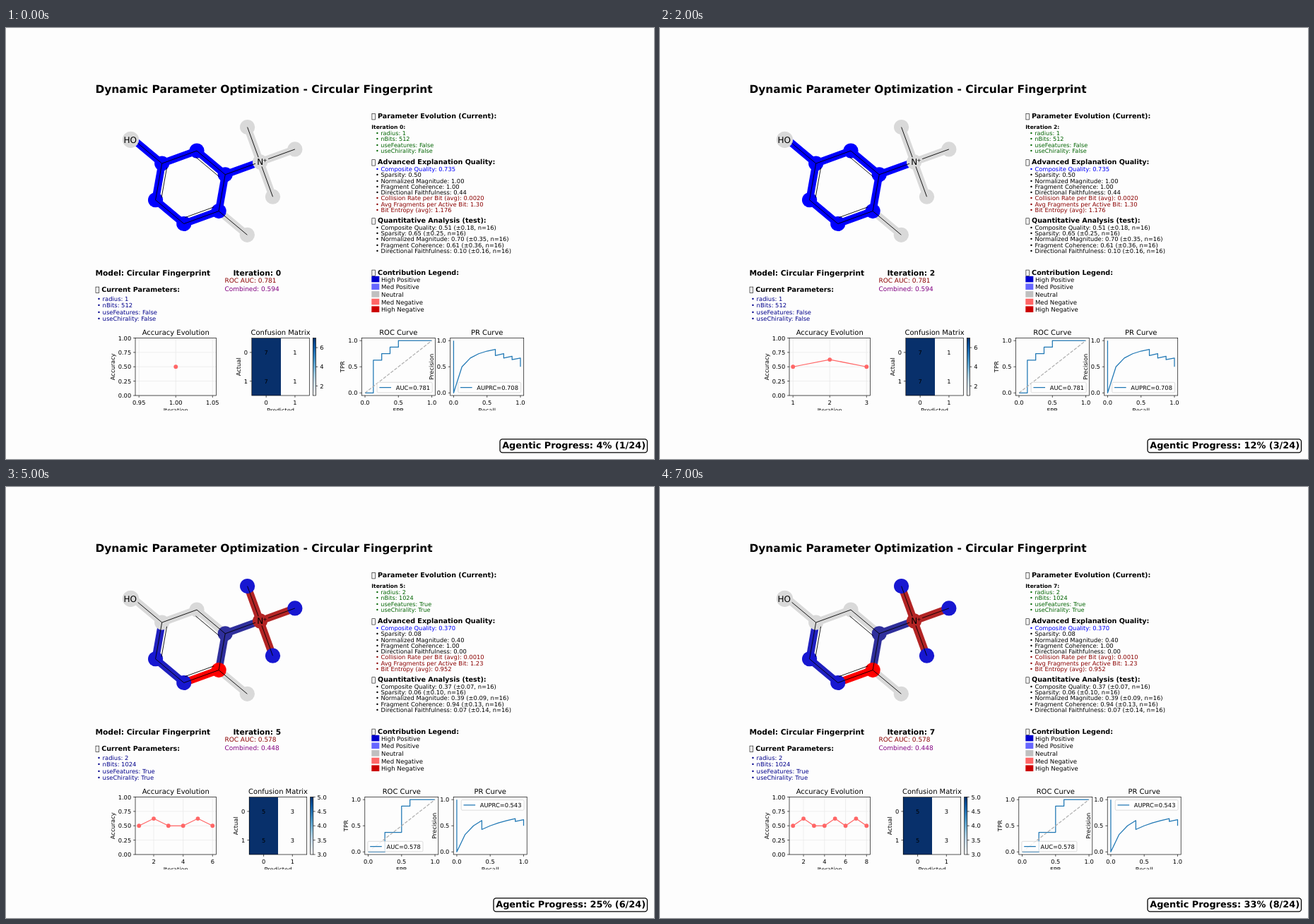
Write an HTML page that moves like this. It is 917 px wide and 611 px high and loops after 8 s.

```html
<!DOCTYPE html>
<html lang="en">
<head>
<meta charset="utf-8">
<title>Dynamic Parameter Optimization</title>
<style>
html, body { margin: 0; width: 100%; height: 100%; overflow: hidden; background: #fdfdfd; }
svg { display: block; width: 917px; height: 611px; font-family: "DejaVu Sans", sans-serif; text-rendering: geometricPrecision; }
</style>
</head>
<body>
<svg id="stage" viewBox="0 0 917 611" xmlns="http://www.w3.org/2000/svg"></svg>
<script>
const STEP = 1000, COUNT = 8, TOTAL = 24;
const stage = document.getElementById('stage');

// P / N: true class of the test samples, ordered by falling score
const early = {
  radius: 1, bits: 512, flag: 'False', auc: '0.781', comb: '0.594', auprc: '0.708',
  quality: ['0.735', '0.50', '1.00', '1.00', '0.44', '0.0020', '1.30', '1.176'],
  quant: ['0.51 (±0.18', '0.65 (±0.25', '0.70 (±0.35', '0.61 (±0.36', '0.10 (±0.16'],
  atoms: 'gbbbbbbggggg', bonds: 'bbbbbbbbgggg',
  cells: [7, 1, 7, 1], bar: ['6', '4', '2'], cmX: 347.8, rocX: 503.3,
  order: 'NPPPPPNPNPNPNNNN', rocKey: 'lower right', prKey: 'lower right'
};
const flat = {
  radius: 1, bits: 512, flag: 'True', auc: '0.562', comb: '0.475', auprc: '0.571',
  quality: ['0.250', '1.00', '0.00', '0.00', '0.00', '0.0020', '1.43', '1.338'],
  quant: ['0.37 (±0.08', '0.43 (±0.22', '0.37 (±0.17', '0.69 (±0.26', '0.00 (±0.00'],
  atoms: 'gggggggggggg', bonds: 'gggggggggggg',
  cells: [6, 2, 4, 4], bar: ['6', '5', '4', '3', '2'], cmX: 345, rocX: 501,
  order: 'NPNPPPPNNNPNPNNP', rocKey: 'center right', prKey: 'upper right'
};
const mixed = {
  radius: 2, bits: 1024, flag: 'True', auc: '0.578', comb: '0.448', auprc: '0.543',
  quality: ['0.370', '0.08', '0.40', '1.00', '0.00', '0.0010', '1.23', '0.952'],
  quant: ['0.37 (±0.07', '0.06 (±0.10', '0.39 (±0.09', '0.94 (±0.13', '0.07 (±0.14'],
  atoms: 'gggiruunuuug', bonds: 'gggirvvinnng',
  cells: [5, 3, 5, 3], bar: ['5.0', '4.5', '4.0', '3.5', '3.0'], cmX: 344.2, rocX: 507.8,
  order: 'NNPPPNNPPPPNPNNN', rocKey: 'lower left', prKey: 'upper right'
};
const wide = {
  radius: 2, bits: 1024, flag: 'False', auc: '0.703', comb: '0.571', auprc: '0.647',
  quality: ['0.489', '0.08', '0.87', '1.00', '0.00', '0.0010', '1.22', '1.028'],
  quant: ['0.39 (±0.08', '0.13 (±0.13', '0.44 (±0.19', '0.86 (±0.22', '0.11 (±0.19'],
  atoms: 'gbbbbbgbbbbb', bonds: 'bbbbbbgbbbbb',
  cells: [7, 1, 5, 3], bar: ['6', '4', '2'], cmX: 344, rocX: 499.6,
  order: 'NPPPNPNPPNPPNNNN', rocKey: 'lower right', prKey: 'upper right'
};
const runs = [early, flat, early, mixed, wide, mixed, wide, mixed];
const accuracy = runs.map(r => (r.cells[0] + r.cells[3]) / 16);

const metrics = ['Composite Quality', 'Sparsity', 'Normalized Magnitude', 'Fragment Coherence',
  'Directional Faithfulness', 'Collision Rate per Bit (avg)', 'Avg Fragments per Active Bit', 'Bit Entropy (avg)'];
const legend = [['High Positive', '#0000cc'], ['Med Positive', '#6666ff'], ['Neutral', '#c0c0c0'],
  ['Med Negative', '#ff6666'], ['High Negative', '#cc0000']];
const tint = { g: '#d9d9d9', b: '#0000ff', r: '#ff0000', i: '#2f2f9c', u: '#1717d1', v: '#2020c0', n: '#b32424' };

// Every bond has the same length; angles are in degrees, counter-clockwise
const BOND = 52.5;
const step = ([x, y], deg) => [x + BOND * Math.cos(deg * Math.PI / 180), y - BOND * Math.sin(deg * Math.PI / 180)];
const ring = [140, 80, 20, -40, -100, -160].map(a => step([260.9, 225.8], a));
const nitro = step(ring[2], 20);
const atoms = [step(ring[0], 140), ...ring, nitro, ...[110, 20, -70].map(a => step(nitro, a)), step(ring[3], -40)];
const bonds = [[0, 1], [1, 2], [2, 3], [3, 4], [4, 5], [5, 6], [6, 1], [3, 7], [7, 8], [7, 9], [7, 10], [4, 11]];
const doubles = [2, 4, 6];
const blues = ['fdfdfd', 'deebf7', 'c6dbef', '9ecae1', '6baed6', '4292c6', '2171b5', '08519c', '08306b'];

const TOP = 439.5, SIDE = 81.5, BOTTOM = TOP + SIDE, FONT = 8.3, CURVE = '#1f77b4';
const LEFT = 126.4, RIGHT = 517.3;

const text = (x, y, s, size, o = {}) =>
  `<text x="${x}" y="${y}" font-size="${size}" fill="${o.fill || '#000'}" text-anchor="${o.anchor || 'start'}"` +
  `${o.bold ? ' font-weight="bold"' : ''}${o.turn ? ` transform="rotate(-90 ${x} ${y})"` : ''}>${s}</text>`;
const line = (x1, y1, x2, y2, color = '#000', w = 0.67, more = '') =>
  `<line x1="${x1}" y1="${y1}" x2="${x2}" y2="${y2}" stroke="${color}" stroke-width="${w}" ${more}/>`;
const rect = (x, y, w, h, fill, more = '') =>
  `<rect x="${x}" y="${y}" width="${w}" height="${h}" fill="${fill}" ${more}/>`;
const path = (pts, color) =>
  `<polyline points="${pts.map(p => p.join()).join(' ')}" fill="none" stroke="${color}" stroke-width="1.25" stroke-linejoin="round"/>`;
const frame = (x, w) => rect(x, TOP, w, SIDE, 'none', 'stroke="#000" stroke-width="0.67"');
const mid = { anchor: 'middle' };

// The box stands for an emoji the font does not have
function heading(x, y, s) {
  return rect(x + 0.6, y - 6.7, 4.7, 8.4, 'none', 'stroke="#000" stroke-width="0.6"') +
    text(x + 8.8, y, s, 9.6, { bold: true });
}
function bullets(x, y, gap, size, items, fill) {
  return items.map((s, i) =>
    text(x, y + gap * i, '• ' + s, size, { fill: typeof fill === 'string' ? fill : fill(i) })).join('');
}
function xTick(x, s) {
  return line(x, BOTTOM, x, BOTTOM + 2.9) + text(x, BOTTOM + 12.8, s, FONT, mid);
}
function yTick(x, y, s) {
  return line(x - 2.9, y, x, y) + text(x - 5.8, y + 3.1, s, FONT, { anchor: 'end' });
}
function labels(x, w, title, xName, yName, yPos) {
  return text(x + w / 2, 434.6, title, 9.96, mid) + text(x + w / 2, 545.2, xName, FONT, mid) +
    text(yPos, TOP + SIDE / 2, yName, FONT, { anchor: 'middle', turn: true });
}
function blue(v) {
  const p = v * 8, i = Math.min(7, Math.floor(p));
  const part = (k, c) => parseInt(blues[k].substr(c * 2, 2), 16);
  return `rgb(${[0, 1, 2].map(c => Math.round(part(i, c) + (part(i + 1, c) - part(i, c)) * (p - i)))})`;
}

function molecule(run) {
  let out = '';
  bonds.forEach(([a, b], i) => { out += line(...atoms[a], ...atoms[b], tint[run.bonds[i]], 10.6); });
  atoms.forEach(([x, y], i) => {
    out += `<circle cx="${i ? x : x - 4}" cy="${y}" r="${i ? 10.6 : 11.6}" fill="${tint[run.atoms[i]]}"/>`;
  });
  bonds.forEach(([a, b], i) => {
    const [x1, y1] = atoms[a], [x2, y2] = atoms[b];
    const ux = (x2 - x1) / BOND, uy = (y2 - y1) / BOND;
    const cut = k => k === 0 ? 8 : k === 7 ? (b === 9 ? 12.3 : 7) : 0;
    const seg = (s, e, dx, dy) =>
      line(x1 + ux * s + dx, y1 + uy * s + dy, x2 - ux * e + dx, y2 - uy * e + dy, '#000', 0.9);
    out += seg(cut(a), cut(b), 0, 0);
    if (doubles.includes(i)) out += seg(4.5, 4.5, -uy * 7.8, ux * 7.8);
  });
  return out + text(166.6, 162.6, 'HO', 12) + text(355.3, 193.8, 'N', 12) + text(363.6, 189.6, '+', 7.2);
}

function accuracyPlot(n) {
  const x0 = 183, w = 114.5;
  const px = k => n === 1 ? x0 + w / 2 + (k - 1) * w / 0.11 : x0 + w / 22 + (k - 1) / (n - 1) * w / 1.1;
  const py = v => BOTTOM - v * SIDE;
  let ticks;
  if (n === 1) ticks = ['0.95', '1.00', '1.05'];
  else if (n === 2) ticks = ['1.0', '1.5', '2.0'];
  else ticks = [1, 2, 3, 4, 5, 6, 7, 8].filter(k => k <= n && (n < 5 || k % 2 === 0));
  let out = '';
  ticks.forEach(k => { out += line(px(+k), TOP, px(+k), BOTTOM, '#e7e7e7') + xTick(px(+k), k); });
  for (let v = 0; v <= 1; v += 0.25) out += line(x0, py(v), x0 + w, py(v), '#e7e7e7') + yTick(x0, py(v), v.toFixed(2));
  const pts = accuracy.slice(0, n).map((v, i) => [px(i + 1), py(v)]);
  out += path(pts, '#ff6666') + pts.map(p => `<circle cx="${p[0]}" cy="${p[1]}" r="2.9" fill="#ff6666"/>`).join('');
  return out + frame(x0, w) + labels(x0, w, 'Accuracy Evolution', 'Iteration', 'Accuracy', 153.8);
}

function matrixPlot(run) {
  const x = run.cmX, half = SIDE / 2, lo = Math.min(...run.cells), hi = Math.max(...run.cells);
  let out = '';
  run.cells.forEach((v, i) => {
    const cx = x + (i % 2) * half, cy = TOP + (i >> 1) * half;
    out += rect(cx, cy, half, half, blue((v - lo) / (hi - lo)), 'shape-rendering="crispEdges"') +
      text(cx + half / 2, cy + half / 2 + 3.1, v, FONT, mid);
  });
  [0, 1].forEach(k => { out += xTick(x + half * (k + 0.5), k) + yTick(x, TOP + half * (k + 0.5), k); });
  out += frame(x, SIDE) + labels(x, SIDE, 'Confusion Matrix', 'Predicted', 'Actual', x - 16);
  const bx = x + 86.5;
  out += rect(bx, TOP, 4.1, SIDE, 'url(#blues)', 'stroke="#000" stroke-width="0.67"');
  run.bar.forEach(s => {
    const y = BOTTOM - (s - lo) / (hi - lo) * SIDE;
    out += line(bx + 4.1, y, bx + 7, y) + text(bx + 9.9, y + 3.1, s, FONT);
  });
  return out;
}

function key(x, w, place, s, textW) {
  const bw = textW + FONT * 3.6, h = 14.6, gap = 4.1;
  const bx = place.includes('left') ? x + gap : x + w - gap - bw;
  const by = place.includes('upper') ? TOP + gap : place.includes('lower') ? BOTTOM - gap - h : TOP + (SIDE - h) / 2;
  return rect(bx, by, bw, h, '#fff', 'fill-opacity="0.8" rx="1.7" stroke="#ccc" stroke-opacity="0.8" stroke-width="0.83"') +
    line(bx + 3.3, by + 7.3, bx + 19.9, by + 7.3, CURVE, 1.25) + text(bx + 26.6, by + 10.3, s, FONT);
}

function curvePlots(run) {
  const w = 104, roc = [[0, 0]], pr = [];
  let tp = 0, fp = 0;
  for (const c of run.order) {
    if (c === 'P') tp++; else fp++;
    roc.push([fp / 8, tp / 8]);
    pr.push([tp / 8, tp / (tp + fp)]);
  }
  pr.unshift([0, 1]);
  const plot = (x, pts, title, xName, yName, extra, box) => {
    const at = ([u, v]) => [x + w * (u + 0.05) / 1.1, BOTTOM - SIDE * (v + 0.05) / 1.1];
    let out = path(pts.map(at), CURVE);
    if (extra) out += line(...at([0, 0]), ...at([1, 1]), '#b0b0b0', 1.25, 'stroke-dasharray="4.6 2"');
    [0, 0.5, 1].forEach(v => { out += xTick(at([v, 0])[0], v.toFixed(1)) + yTick(x, at([0, v])[1], v.toFixed(1)); });
    return out + frame(x, w) + labels(x, w, title, xName, yName, x - 23.9) + box;
  };
  const rx = run.rocX, px = rx + 125.4;
  return plot(rx, roc, 'ROC Curve', 'FPR', 'TPR', true, key(rx, w, run.rocKey, 'AUC=' + run.auc, 48.2)) +
    plot(px, pr, 'PR Curve', 'Recall', 'Precision', false, key(px, w, run.prKey, 'AUPRC=' + run.auprc, 59));
}

function side(run, i, params) {
  const indent = RIGHT + 5.6;
  let out = heading(RIGHT, 128.2, 'Parameter Evolution (Current):') +
    text(RIGHT, 143, `Iteration ${i}:`, 7.55, { bold: true }) +
    bullets(indent, 152.1, 8.25, 8.15, params, '#006400') +
    heading(RIGHT, 193.4, 'Advanced Explanation Quality:') +
    bullets(indent, 203.2, 8.25, 8.33, metrics.map((m, k) => `${m}: ${run.quality[k]}`),
      k => k === 0 ? '#0000ff' : k < 5 ? '#000' : '#8b0000') +
    heading(RIGHT, 276.4, 'Quantitative Analysis (test):') +
    bullets(indent, 285.7, 8.33, 8.35, run.quant.map((q, k) => `${metrics[k]}: ${q}, n=16)`), '#000') +
    heading(RIGHT, 349.8, 'Contribution Legend:');
  legend.forEach(([name, color], k) => {
    out += rect(RIGHT, 351.8 + 10.65 * k, 11, 8.6, color) + text(531, 359.6 + 10.65 * k, name, 8.55);
  });
  return out;
}

function progress(i) {
  const pct = Math.round((i + 1) / TOTAL * 100 - 1e-6);
  const x = pct < 10 ? 699 : 690;
  return rect(x, 582.8, 907.5 - x, 19, '#fff', 'rx="3.6" stroke="#000" stroke-width="1.3"') +
    text(905, 596.3, `Agentic Progress: ${pct}% (${i + 1}/${TOTAL})`, 12.85, { bold: true, anchor: 'end' });
}

const defs = '<defs><linearGradient id="blues" x1="0" y1="1" x2="0" y2="0">' +
  blues.map((c, i) => `<stop offset="${i / 8}" stop-color="#${c}"/>`).join('') +
  '</linearGradient><clipPath id="cut"><rect width="917" height="542.3"/></clipPath></defs>';

function draw(i) {
  const run = runs[i];
  const params = [`radius: ${run.radius}`, `nBits: ${run.bits}`, `useFeatures: ${run.flag}`, `useChirality: ${run.flag}`];
  stage.innerHTML = defs + rect(0, 0, 917, 611, '#fdfdfd') +
    text(LEFT, 92, 'Dynamic Parameter Optimization - Circular Fingerprint', 15.44, { bold: true }) +
    molecule(run) + side(run, i, params) +
    text(LEFT, 351.4, 'Model: Circular Fingerprint', 10.67, { bold: true }) +
    text(321.4, 351.4, `Iteration: ${i}`, 10.67, { bold: true }) +
    text(309.4, 361.3, 'ROC AUC: ' + run.auc, 9, { fill: '#8b0000' }) +
    text(309.4, 373.2, 'Combined: ' + run.comb, 9, { fill: '#800080' }) +
    heading(LEFT, 373.8, 'Current Parameters:') +
    bullets(LEFT + 2.6, 386.8, 9.45, 8.4, params, '#00008b') +
    `<g clip-path="url(#cut)">${accuracyPlot(i + 1)}${matrixPlot(run)}${curvePlots(run)}</g>` +
    progress(i);
}

let shown = -1;
function tick() {
  const i = Math.floor(performance.now() / STEP) % COUNT;
  if (i !== shown) draw(shown = i);
  requestAnimationFrame(tick);
}
tick();
</script>
</body>
</html>
```
